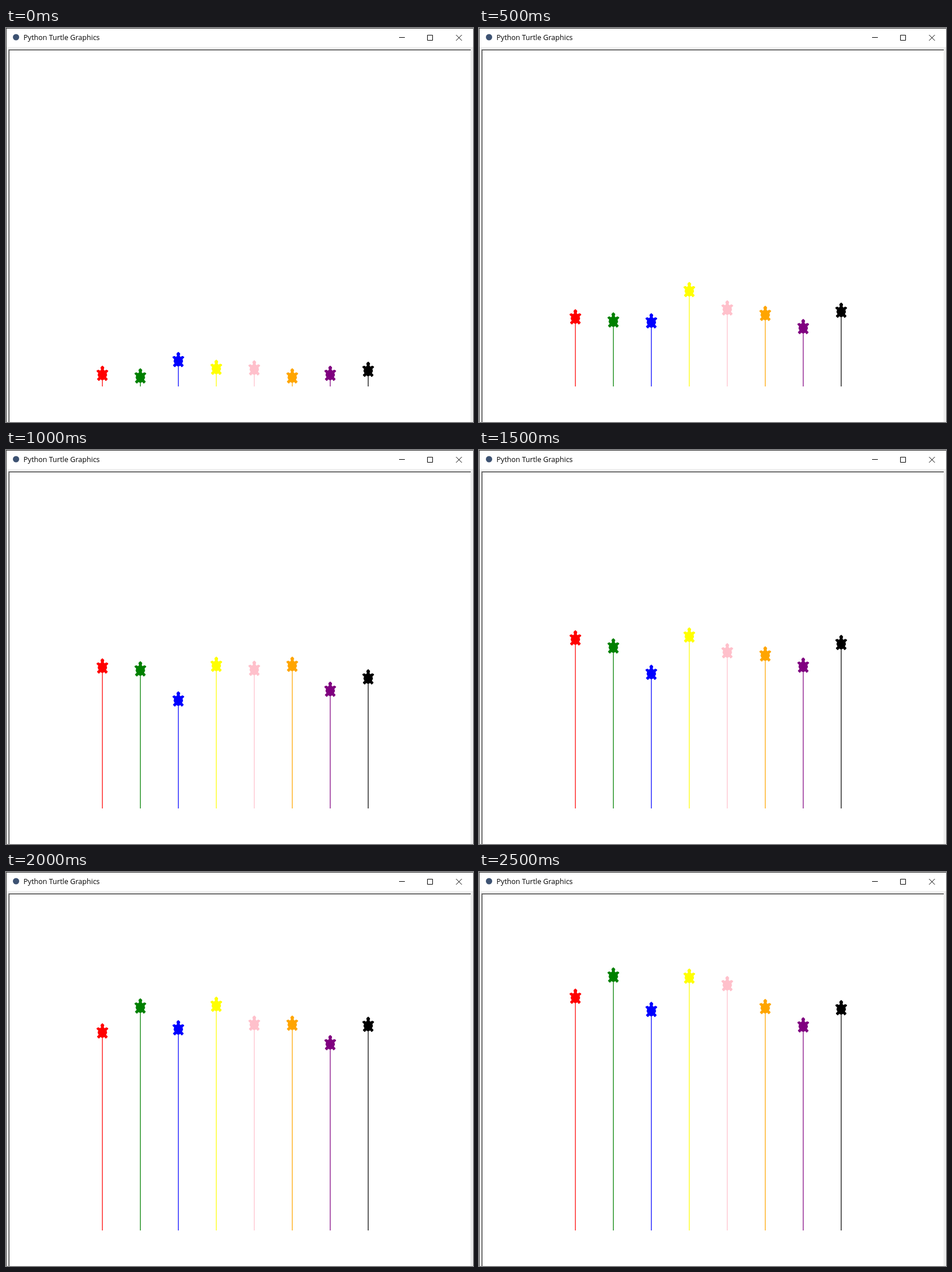
Recreate the animation shown at these times as an HTML page with a canvas. Size 815x687 px, loop 3000 ms.

```html
<!DOCTYPE html>
<html lang="en">
<head>
<meta charset="utf-8">
<title>Turtle race</title>
<style>
html, body { margin: 0; width: 100%; height: 100%; overflow: hidden; background: #f0f0f0; }
canvas { display: block; }
</style>
</head>
<body>
<canvas id="stage" width="815" height="687"></canvas>
<script>
const ctx = document.getElementById('stage').getContext('2d');
const STEP = 500, START_Y = 625, HEAD = 17.6;

// Right half of the turtle outline, from head to tail
const half = [[0, 16], [2, 14], [1, 10], [4, 7], [7, 9], [9, 8], [6, 5], [7, 1],
  [5, -3], [8, -6], [6, -8], [4, -5], [0, -7]];
const outline = [...half, ...half.slice(1, -1).reverse().map(([x, y]) => [-x, y])];

// Height of each head tip after every step
const racers = [
  ['red', 588.5, 490, 363, 314, 263.5, 203],
  ['green', 593, 495.5, 368, 328, 220, 166],
  ['blue', 564.5, 497, 420.5, 374, 258, 226],
  ['yellow', 578, 442.5, 360, 309, 217, 168],
  ['pink', 579, 474.5, 367, 336.5, 250, 181],
  ['orange', 593, 484, 360, 342, 250, 221],
  ['purple', 588.5, 507, 403.5, 361.5, 284, 253],
  ['black', 581.5, 478.5, 382, 322, 252, 223]
];

function rect(color, x, y, w, h) {
  ctx.fillStyle = color;
  ctx.fillRect(x, y, w, h);
}

function drawWindow() {
  rect('#f0f0f0', 0, 0, 815, 687);
  rect('#fff', 0, 0, 815, 33);
  rect('#2b2b2b', 0, 0, 815, 1);
  rect('#3c3c3c', 0, 0, 1, 687);
  rect('#a0a0a0', 4, 37, 808, 650);
  rect('#e3e3e3', 811, 37, 1, 650);
  rect('#404040', 5, 38, 806, 649);
  rect('#fff', 6, 39, 805, 648);

  ctx.fillStyle = '#3d5272';
  ctx.beginPath();
  ctx.arc(17.5, 16, 5.5, 0, 2 * Math.PI);
  ctx.fill();

  ctx.fillStyle = '#000';
  ctx.font = '12.55px "Open Sans", "Noto Sans", sans-serif';
  ctx.fillText('Python Turtle Graphics', 30.5, 21);

  rect('#000', 686, 16, 10, 1);
  ctx.strokeStyle = '#000';
  ctx.lineWidth = 1;
  ctx.strokeRect(735.5, 12.5, 9, 9);
  ctx.beginPath();
  ctx.moveTo(785.5, 12);
  ctx.lineTo(795.5, 22);
  ctx.moveTo(795.5, 12);
  ctx.lineTo(785.5, 22);
  ctx.stroke();
}

function drawRacer(color, x, y) {
  ctx.fillStyle = ctx.strokeStyle = color;
  ctx.lineWidth = 1.25;
  ctx.beginPath();
  ctx.moveTo(x, START_Y);
  ctx.lineTo(x, y);
  ctx.stroke();

  ctx.lineWidth = 2.4;
  ctx.lineJoin = 'round';
  ctx.beginPath();
  for (const [dx, dy] of outline) ctx.lineTo(x + dx, y - dy);
  ctx.closePath();
  ctx.fill();
  ctx.stroke();
}

function draw(now) {
  const step = Math.floor(now / STEP) % 6;
  drawWindow();
  racers.forEach(([color, ...tips], i) => drawRacer(color, 168.2 + 66.27 * i, tips[step] + HEAD));
  requestAnimationFrame(draw);
}
draw(performance.now());
</script>
</body>
</html>
```
